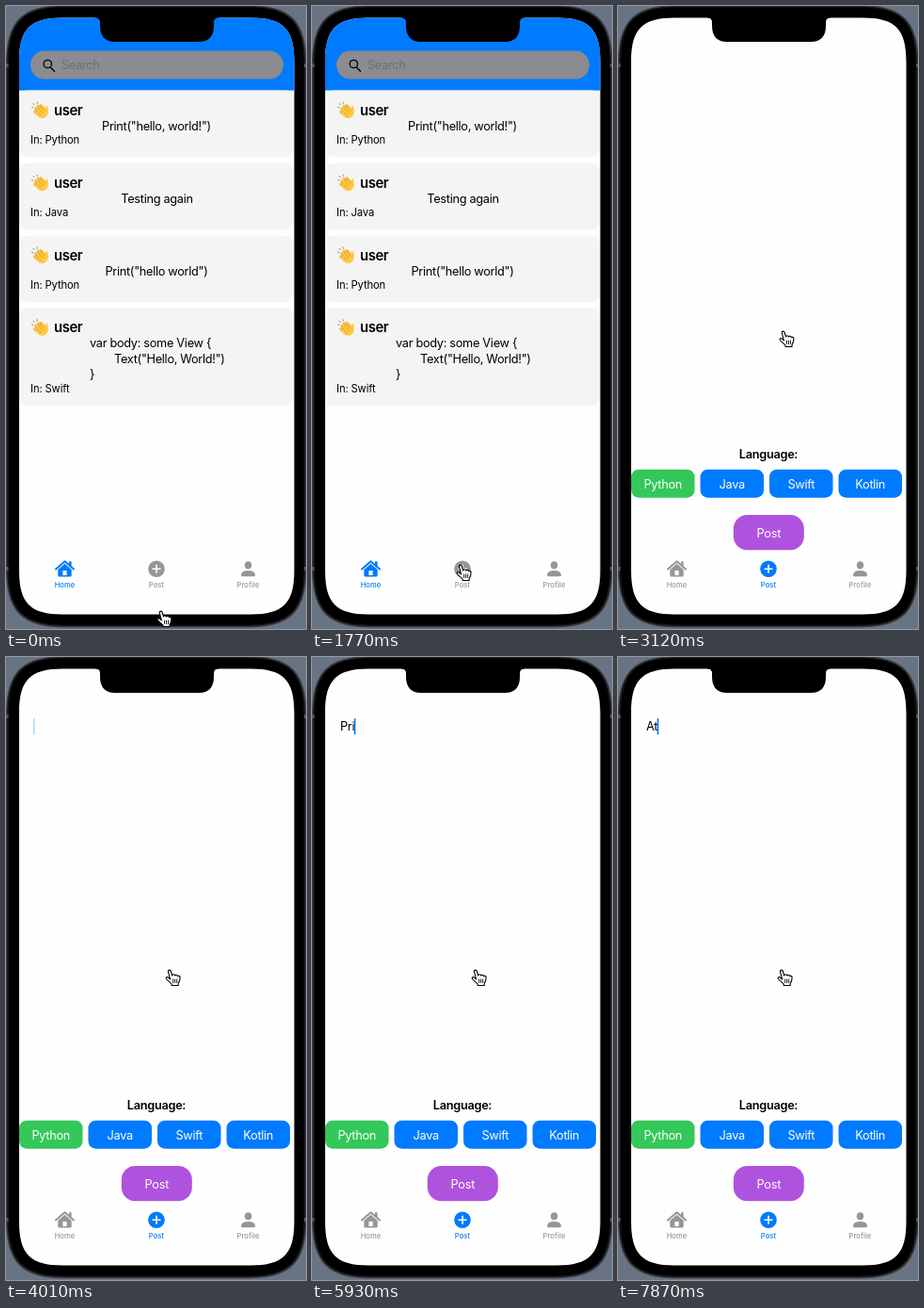
An HTML page for the animation above (8 s loop, 319 px wide and 661 px high).

```html
<!DOCTYPE html>
<html lang="en">
<head>
<meta charset="utf-8">
<style>
  html, body { margin: 0; height: 100%; overflow: hidden; background: #687484; }
  svg { display: block; }
  text { font: 12.75px Inter, "Liberation Sans", sans-serif; letter-spacing: -.024em; white-space: pre; }
  .mid { text-anchor: middle; }
  .name { font-size: 14.8px; font-weight: 600; }
  .small { font-size: 11.25px; letter-spacing: -.012em; }
  .bold { font-weight: 600; }
  .tab { font-size: 7.5px; font-weight: 500; letter-spacing: .015em; }
</style>
</head>
<body>
<svg width="319" height="661" viewBox="0 0 319 661">
  <defs>
    <clipPath id="screen"><path id="glass"/></clipPath>
    <g id="clap">
      <path d="M6 8l7 7M8.500 5.500l7 7M5 11.500l6 5M11.500 5l5 5" stroke="#f7bd38" stroke-width="3" stroke-linecap="round" fill="none"/>
      <path d="M6 11l8-5 2.500 1.500q.5-3 2-1.500 1.500 5 .5 8-2 4.500-6 4.500-3 0-5.500-3z" fill="#fcc945"/>
      <path d="M6 9.500l6 6M8 7l6.500 6.500M11 6l5 5" stroke="#d28d1c" stroke-width=".7" fill="none"/>
      <path d="M1.500 6.500l2 .8M3.300 2.500l1.500 2M7.500 1l.3 2.200" stroke="#8d8d8d" stroke-width="1" fill="none"/>
    </g>
  </defs>

  <path id="frame" fill="#3b3c40"/>
  <path id="rim" fill="#151516"/>
  <path id="bezel"/>
  <path d="M0 63h2.500M0 597h2.500M317 63h2M317 597h2" stroke="#55575b" stroke-width="4"/>

  <g clip-path="url(#screen)">
    <path d="M0 0h319v661H0z" fill="#fefefe"/>
    <g id="home"></g>
    <g id="post"></g>
    <g id="tabs"></g>
  </g>
  <path d="M95 12h131v.5q-5 0-5 5v3.500q0 17-16 17h-89q-16 0-16-17v-3.500q0-5-5-5z"/>

  <g id="hand" stroke="#000" stroke-width="1.100" stroke-linejoin="round" stroke-linecap="round">
    <path fill="#fff" d="M-1.300 1.600C-1.300-.3 1.200-.3 1.700 1.500L3 6C3.300 4.300 5.600 4.300 6 6 6.400 4.800 8.500 5 8.800 6.700 9.500 5.800 11.400 6.300 11.400 8c0 3.500-.4 4.500-1.900 6.500v2H2.500V15C.5 12.800-1.800 11.500-3.300 9.500-4 7.800-2.300 7-1 8.200L.9 9.800z"/>
    <path fill="none" stroke-width=".9" d="M4 10v3.500M6 10v3.500M8 10v3.500"/>
  </g>
</svg>

<script>
const BLUE = '#007aff', GRAY = '#969698';
const $ = id => document.getElementById(id);
const text = (x, y, s, cls = '', fill = '#000') =>
  `<text x="${x}" y="${y}" class="${cls}" fill="${fill}">${s}</text>`;
const box = (x, y, w, h, r, fill) =>
  `<rect x="${x}" y="${y}" width="${w}" height="${h}" rx="${r}" fill="${fill}"/>`;

// Rectangle whose corners ease into the straight sides
function smooth(id, x, y, w, h, r) {
  const a = r * 1.25, b = r * .93;
  $(id).setAttribute('d', `M${x + a} ${y}h${w - 2 * a}c${b} 0 ${a} ${a - b} ${a} ${a}v${h - 2 * a}`
    + `c0 ${b} ${b - a} ${a} ${-a} ${a}h${2 * a - w}c${-b} 0 ${-a} ${b - a} ${-a} ${-a}`
    + `v${2 * a - h}c0 ${-b} ${a - b} ${-a} ${a} ${-a}z`);
}
smooth('frame', 0, -1, 319.5, 660.5, 51);
smooth('rim', 1.2, .3, 317, 657.8, 50);
smooth('bezel', 3, 1.5, 313.5, 655, 48);
smooth('glass', 14, 12.4, 292.5, 633, 37);

function card(y, h, lang, code) {
  return box(14, y, 292, h, 8, '#f4f4f4')
    + `<use href="#clap" x="25.500" y="${y + 11}"/>`
    + text(51, y + 26, 'user', 'name') + code
    + text(26, y + h - 14.2, 'In: ' + lang, 'small');
}

$('home').innerHTML = box(14, 0, 293, 89.6, 0, BLUE)
  + box(26, 47.6, 269, 30, 15, '#8b8b90')
  + '<path d="M47.800 65.500l3.700 3.700" stroke="#000" stroke-width="1.400" stroke-linecap="round"/>'
  + '<circle cx="44.300" cy="61.500" r="4.200" fill="none" stroke="#000" stroke-width="1.300"/>'
  + text(59, 67.4, 'Search', '', '#707075')
  + card(89.6, 70.4, 'Python', text(160, 132, 'Print("hello, world!")', 'mid'))
  + card(166.7, 70.3, 'Java', text(160.5, 209, 'Testing again', 'mid'))
  + card(243.5, 70.5, 'Python', text(160, 285.7, 'Print("hello world")', 'mid'))
  + card(320.3, 103.7, 'Swift', text(89, 362, 'var body: some View {')
    + text(115, 378.5, 'Text("Hello, World!")') + text(89, 395, '}'));

$('post').innerHTML = box(28, 66, 18, 18, 3, '#d5e7fc')
  + text(30, 78, '') + box(0, 65, 1.6, 17.5, .8, BLUE)
  + text(160, 479.5, 'Language:', 'mid bold')
  + ['Python', 'Java', 'Swift', 'Kotlin'].map((s, i) =>
      box(14 + 73.5 * i, 491.7, 67.5, 30, 8, i ? BLUE : '#34c759')
      + text(47.7 + 73.5 * i, 511.5, s, 'mid', '#fff')).join('')
  + box(122.8, 540, 75, 37.2, 14.5, '#af52de') + text(160.3, 563.5, 'Post', 'mid', '#fff');
const [mark, typed, caret] = $('post').children;

const icons = [
  `<path d="M53 597.500l9.500-8.300 9.500 8.300" fill="none" stroke="currentColor" stroke-width="2" stroke-linecap="round" stroke-linejoin="round"/>
   <path d="M67 589.300h2.600v5.500H67zM55.300 598l7.200-6.200 7.200 6.200v6q0 1.600-1.600 1.600H56.900q-1.600 0-1.600-1.600z" fill="currentColor"/>
   <path d="M60.400 599h4.200v5h-4.200z" fill="#fff"/>`,
  `<circle cx="160" cy="597.300" r="8.800" fill="currentColor"/>
   <path d="M160 593.300v8M156 597.300h8" stroke="#fff" stroke-width="1.600" stroke-linecap="round"/>`,
  `<ellipse cx="257.500" cy="593.300" rx="3.700" ry="4.100" fill="currentColor"/>
   <path d="M250 604q0-5 7.500-5t7.500 5q0 1.200-1.500 1.200h-12q-1.500 0-1.500-1.200z" fill="currentColor"/>`
];
$('tabs').innerHTML = ['Home', 'Post', 'Profile'].map((s, i) =>
  `<g>${icons[i]}${text(62.5 + 97.5 * i, 617, s, 'mid tab', 'currentColor')}</g>`).join('');

// Pointer tip: tick, x, y
const path = [[0, 164.5, 642], [4, 146, 596], [8, 169, 518], [12, 157.7, 593],
  [18, 157.7, 593], [21, 175.5, 345], [22, 173.7, 332], [99, 173.7, 332]];

// Editor state: tick, text, caret opacity
const edits = [[0, '', 0], [23, '', 1], [27, '', .3], [28, '', 0], [29, '', 1],
  [30, 'P', 1], [31, 'Pr', 1], [32, 'Pri', 1], [33, 'Prin', 1], [34, 'Print', 1],
  [38, 'Print', .3], [39, 'Prin', 1], [40, 'Pri', 1], [41, 'Pr', 1], [42, 'P', 1],
  [43, '', 1], [46, 'Sy', 1], [50, 'At ', 1], [53, 'At', 1]];

function draw(ms) {
  const tick = Math.floor((ms + 10) / 148.3);
  const posting = tick >= 17;
  $('home').style.display = posting ? 'none' : '';
  $('post').style.display = posting ? '' : 'none';
  [...$('tabs').children].forEach((g, i) => g.style.color = i === +posting ? BLUE : GRAY);

  const n = path.findIndex(p => p[0] > tick);
  const [t0, x0, y0] = path[n - 1], [t1, x1, y1] = path[n];
  const k = (tick - t0) / (t1 - t0);
  $('hand').setAttribute('transform', `translate(${x0 + (x1 - x0) * k} ${y0 + (y1 - y0) * k})`);

  const [, str, alpha] = edits.findLast(e => e[0] <= tick);
  typed.textContent = str;
  caret.setAttribute('x', str && posting ? 29.5 + typed.getComputedTextLength() : 29);
  caret.style.opacity = alpha;
  mark.style.opacity = tick >= 48 && tick < 50 ? 1 : 0;
}

function loop(now) {
  draw(now % 8000);
  requestAnimationFrame(loop);
}
draw(0);
requestAnimationFrame(loop);
</script>
</body>
</html>
```
